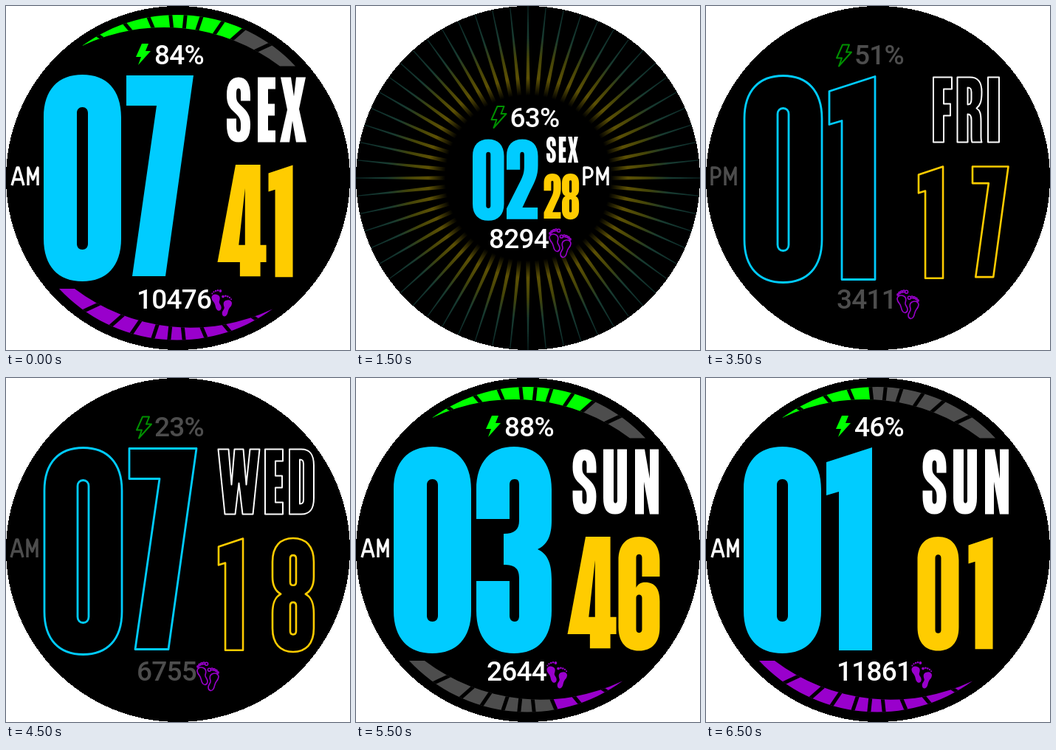
An HTML page that plays this animation: 466x466 px, repeating every 7 s.

```html
<!DOCTYPE html>
<html lang="en">
<head>
<meta charset="utf-8">
<title>Watch face</title>
<style>
html, body { margin: 0; width: 100%; height: 100%; overflow: hidden; background: #fff; }
svg { display: block; width: 100vw; height: 100vh; }
text { font: 500 37px Roboto, "Liberation Sans", sans-serif; letter-spacing: -.8px; }
path { vector-effect: non-scaling-stroke; fill-rule: evenodd; }
</style>
</head>
<body>
<svg viewBox="0 0 466 466">
  <defs>
    <clipPath id="band"><path d="M103 54A219 219 0 0 1 392 81.500H371A260 260 0 0 0 103 54Z"/></clipPath>
    <radialGradient id="glow" gradientUnits="userSpaceOnUse" cx="233" cy="233" r="233">
      <stop offset=".48" stop-color="#000"/>
      <stop offset=".58" stop-color="#5c5004"/>
      <stop offset=".7" stop-color="#444408"/>
      <stop offset=".82" stop-color="#173a30"/>
      <stop offset="1" stop-color="#0e2e2c"/>
    </radialGradient>
  </defs>
  <circle cx="233" cy="233" r="233" shape-rendering="crispEdges"/>
  <g id="face"></g>
</svg>
<script>
const BLUE = '#00ccff', YELLOW = '#ffcc00', GREEN = '#00ff00', PURPLE = '#9900cc',
      GRAY = '#4d4d4d', DARK_GREEN = '#009000';

// Numerals in a 105 x 280 box
const CAP = 'C0 20 20 0 52.5 0S105 20 105 58';
const BASE = 'C105 260 85 280 52.5 280S0 260 0 222';
const slot = (top, bottom) =>
  `M45 ${top + 8}C45 ${top + 3} 48 ${top} 52.5 ${top}S60 ${top + 3} 60 ${top + 8}V${bottom - 8}` +
  `C60 ${bottom - 3} 57 ${bottom} 52.5 ${bottom}S45 ${bottom - 3} 45 ${bottom - 8}Z`;
const DIGITS = {
  0: `M0 58${CAP}V222${BASE}Z${slot(44, 237)}`,
  1: 'M0 21L62 1V276H17V61L0 66Z',
  2: `M0 105V58${CAP}V90C105 125 95 145 80 175L53 235H104V275H0V238L48 140C57 121 59 110 59 90V55C59 47 57 44 52 44S45 47 45 55V105Z`,
  3: 'M0 98V58C0 20 20 0 51 0S102 20 102 58V100C102 121 96 133 83 139C96 145 102 157 102 180V222C102 260 83 280 51 280S0 260 0 222V182H45V229C45 234 48 237 52 237S58 234 58 229V178C58 165 52 160 37 160V118C52 118 58 112 58 100V52C58 47 57 44 52 44S45 47 45 52V98Z',
  4: 'M46 0H109V197H124V239H109V274H57V239H0ZM70 58L54 197H70Z',
  7: 'M0 1H91L53 273H8L41 42H0Z',
  8: `M0 58${CAP}V95C105 118 98 130 84 137.500C98 145 105 158 105 185V222${BASE}V185C0 158 7 145 21 137.500C7 130 0 118 0 95Z${slot(42, 116)}${slot(158, 237)}`,
  9: `M0 58${CAP}V222${BASE}V182H45V229C45 234 48 237 52.5 237S60 234 60 229V155C55 164 48 168 37 168C12 168 0 152 0 122Z${slot(44, 138)}`
};

// Weekday capitals, 88 high
const LETTERS = {
  S: 'M0 24C0 8 6 0 16 0S32 8 32 24V32H19V21C19 17 18 15 16 15S13 17 13 21V26C13 32 15 34 20 39C29 47 32 53 32 64C32 80 27 88 16 88S0 80 0 64V56H13V68C13 72 14 74 16 74S19 72 19 68V63C19 57 17 54 12 49C3 41 0 36 0 24Z',
  E: 'M0 0H24V16H14V36H23V52H14V72H24V88H0Z',
  X: 'M1 0H15L19 26L22 0H35L26 43L36 88H22L17 59L13 88H0L10 44Z',
  U: 'M0 0H14V68C14 72 15 73 16.500 73S19 72 19 68V0H32V66C32 81 27 88 16 88S0 81 0 66Z',
  N: 'M0 0H13L20 40V0H32V88H20L12 44V88H0Z',
  F: 'M0 0H25V16H14V36H23V52H14V88H0Z',
  R: 'M0 0H17C28 0 33 6 33 20C33 33 31 38 26 42C31 45 32 50 32 60V80C32 84 32 86 33 88H20C19 86 19 84 19 80V58C19 53 18 50 14 50V88H0ZM14 14V37C18 37 19 34 19 30V20C19 16 18 14 14 14Z',
  I: 'M0 0H15V88H0Z',
  W: 'M0 0H14L18 48L22 0H34L38 48L43 0H56L47 88H33L28 46L23 88H9Z',
  D: 'M0 0H16C28 0 33 7 33 22V66C33 81 28 88 16 88H0ZM14 14V74C18 74 19 72 19 68V20C19 16 18 14 14 14Z',
  Q: 'M0 22C0 7 6 0 16.500 0S33 7 33 22V66C33 72 32 76 30 80L35 87L28 93L22 87C7 91 0 82 0 66ZM14 20C14 16 15 14 16.500 14S19 16 19 20V68C19 72 18 74 16.500 74S14 72 14 68Z'
};
const DAY_X = { SEX: [299, 341, 371], SUN: [293.5, 335, 378], FRI: [308, 340.5, 382], WED: [287.5, 351, 384], QUI: [299, 341, 383] };

const MERIDIEM = {
  AM: 'M1 25L8 1H10L17 25M4 17H14M23 25V1L29.500 17L36 1V25',
  PM: 'M2 25V1H7C15 1 15 14 7 14H2M20 25V1L27 17L34 1V25'
};
const BOLT = 'M8 0H17L13 10H20L3 29L7 18H0Z';
const SOLE = 'M1 13C2 9 6 8 10 10C14 12 13 16 12 19C11 22 15 24 15 28C15 33 10 34 8 30C6 27 7 24 4 20C2 18 1 16 1 13Z';
const TOES = [[2, 8, 1.1], [4.2, 5.6, 1.2], [7, 4.2, 1.3], [10, 3.4, 1.4], [13.6, 4.2, 2]];
// x of the dividers on the outer edge of the gauge
const DIVIDERS = [122, 159, 192, 222.5, 243.5, 266, 296, 325, 362];

const paint = (color, line) => line
  ? `fill="none" stroke="${color}" stroke-width="${line}" stroke-linejoin="round"` : `fill="${color}"`;
const shape = (d, x, y, sx, sy, style) =>
  `<path d="${d}" transform="translate(${x} ${y}) scale(${sx} ${sy})" ${style}/>`;
const label = (str, x, y, color) => `<text x="${x}" y="${y}" fill="${color}">${str}</text>`;

function digit(n, x, y, sx, sy, style) {
  return n === '6'
    ? shape(DIGITS[9], x + 105 * sx, y + 280 * sy, -sx, -sy, style)
    : shape(DIGITS[n], x, y, sx, sy, style);
}
const pair = (str, x1, x2, y, sx, sy, style) =>
  digit(str[0], x1, y, sx, sy, style) + digit(str[1], x2, y, sx, sy, style);

function weekday(name, style, x = DAY_X[name][0], y = 96.5, k = 1) {
  const [first] = DAY_X[name];
  return [...name].map((c, i) =>
    shape(LETTERS[c], x + (DAY_X[name][i] - first) * k, y, k, k, style)).join('');
}

const meridiem = (name, x, y, color) => shape(MERIDIEM[name], x, y, 1, 1, paint(color, 3.4));

function feet(x, y, k, line) {
  const style = paint(PURPLE, line);
  const foot = `<path d="${SOLE}" ${style}/>` +
    TOES.map(([cx, cy, r]) => `<circle cx="${cx}" cy="${cy}" r="${r}" ${style}/>`).join('');
  return `<g transform="translate(${x} ${y}) scale(${k})">${foot}` +
    `<g transform="translate(31 8) scale(-1 1)">${foot}</g></g>`;
}

function gauge(lit, color, turn = '') {
  const far = x => `${x} ${233 - Math.sqrt(224 ** 2 - (x - 233) ** 2)}`;
  const edges = [60, ...DIVIDERS, 425];
  const wedges = edges.slice(1).map((x, i) =>
    `<path d="M233 110L${far(edges[i])}L${(edges[i] + x) / 2} -20L${far(x)}Z" fill="${i < lit ? color : GRAY}"/>`);
  const gaps = DIVIDERS.map(x => `<path d="M233 110L${far(x)}" stroke="#000" stroke-width="5"/>`);
  return `<g clip-path="url(#band)" ${turn}>${wedges.join('')}${gaps.join('')}</g>`;
}

const footX = steps => 178 + 20 * String(steps).length;

function solid({ hour, min, day, half, power, bars, steps, walked }) {
  return gauge(bars, GREEN) + gauge(walked, PURPLE, 'transform="rotate(180 232 232.300)"') +
    shape(BOLT, 176, 51, 1, 1, paint(GREEN)) + label(power + '%', 201, 78.5, '#fff') +
    meridiem(half, 7, 218, '#fff') +
    pair(hour, 51, 163, 93, 1, 1, paint(BLUE)) +
    pair(min, 286.5, 355.5, 215, .533, .552, paint(YELLOW)) +
    weekday(day, paint('#fff')) +
    label(steps, 177, 410, '#fff') + feet(footX(steps) - .5, 382, .95);
}

function outline({ hour, min, day, half, power, steps }) {
  return shape(BOLT, 177, 52.5, 1, 1, paint(DARK_GREEN, 2)) + label(power + '%', 201, 78.5, GRAY) +
    meridiem(half, 6, 218, GRAY) +
    pair(hour, 52, 167, 94.5, 1, 1, paint(BLUE, 2.8)) +
    pair(min, 288, 361, 217, .533, .55, paint(YELLOW, 2.6)) +
    weekday(day, paint('#fff', 2)) +
    label(steps, 177, 410, GRAY) + feet(footX(steps), 383, 1, 1.6);
}

function rays({ hour, min, day, half, power, steps }) {
  const spikes = Array.from({ length: 60 }, (_, i) =>
    `<path d="M230.200 121H235.800L233.500 0H232.500Z" transform="rotate(${i * 6} 233 233)" fill="url(#glow)"/>`);
  return spikes.join('') +
    shape(BOLT, 183.5, 136, 1, 1, paint(DARK_GREEN, 2)) + label(power + '%', 208.5, 164, '#fff') +
    pair(hour, 158, 204, 180.5, .405, .394, paint(BLUE)) +
    pair(min, 254.5, 279, 227, .22, .222, paint(YELLOW)) +
    weekday(day, paint('#fff'), 258, 177, .4) +
    meridiem(half, 307, 218, '#fff') +
    label(steps, 180, 328, '#fff') + feet(261, 300, 1, 1.6);
}

const scene = (at, draw, hour, min, day, half, power, bars, steps, walked) =>
  ({ at, draw, hour, min, day, half, power, bars, steps, walked });
const SCENES = [
  scene(0, solid, '07', '41', 'SEX', 'AM', 84, 8, 10476, 10),
  scene(500, solid, '08', '24', 'SEX', 'AM', 72, 7, 12034, 10),
  scene(1000, solid, '09', '19', 'SEX', 'AM', 24, 1, 6622, 5),
  scene(1500, rays, '02', '28', 'SEX', 'PM', 63, 0, 8294, 0),
  scene(2500, rays, '02', '48', 'QUI', 'PM', 57, 0, 7763, 0),
  scene(3000, outline, '03', '28', 'WED', 'PM', 51, 0, 12904, 0),
  scene(3500, outline, '01', '17', 'FRI', 'PM', 51, 0, 3411, 0),
  scene(4500, outline, '07', '18', 'WED', 'AM', 23, 0, 6755, 0),
  scene(5000, solid, '02', '36', 'SUN', 'AM', 32, 3, 8190, 8),
  scene(5500, solid, '03', '46', 'SUN', 'AM', 88, 8, 2644, 3),
  scene(6000, solid, '06', '24', 'SUN', 'PM', 71, 7, 9482, 10),
  scene(6500, solid, '01', '01', 'SUN', 'AM', 46, 4, 11861, 10)
];
const LOOP = 7000;
const face = document.getElementById('face');
const start = performance.now();
let shown;

function update() {
  const t = (performance.now() - start) % LOOP;
  const current = SCENES.filter(s => s.at <= t).pop();
  if (current !== shown) {
    shown = current;
    face.innerHTML = current.draw(current);
  }
  requestAnimationFrame(update);
}
update();
</script>
</body>
</html>
```
